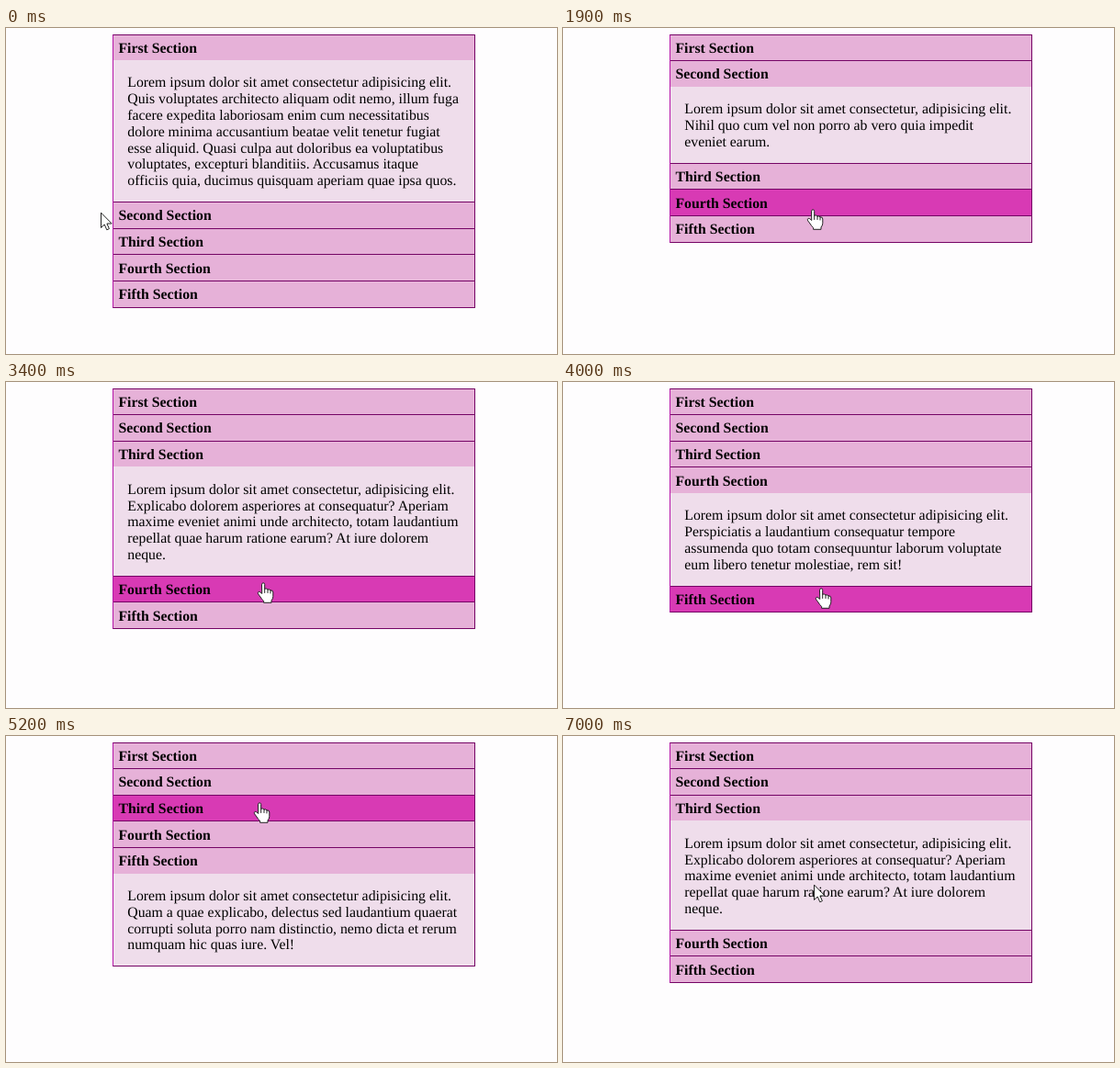
Animation, 600 px wide and 355 px high, one loop 7100 ms. Source, as an HTML page:

```html
<!DOCTYPE html>
<html lang="en">
<head>
<meta charset="utf-8">
<title>Accordion</title>
<style>
  html, body { margin: 0; width: 100%; height: 100%; overflow: hidden; background: #fefdfe; }
  body {
    position: relative;
    font: 15.8px/17.78px "Liberation Serif", "Times New Roman", Times, serif;
    color: #000;
    text-rendering: geometricPrecision;
  }
  #box {
    position: absolute; left: 116px; top: 7px; width: 395px; box-sizing: border-box;
    border: 1px solid #750465; border-left-color: #b515a8;
    background: #efddeb; overflow: hidden;
  }
  .head, .text { position: absolute; left: 0; right: 0; white-space: pre; }
  .head {
    box-sizing: border-box; border-top: 1px solid #750465;
    padding-left: 5.4px; background: #e6b1d8; font-weight: bold;
  }
  .head.hover { background: #d83ab4; }
  .text { padding-left: 15.3px; display: none; }
  .text.open { display: block; }
  #cursor { position: absolute; left: 0; top: 0; overflow: visible; }
  #cursor g { display: none; }
  #cursor .on { display: inline; }
</style>
</head>
<body>
<div id="box"></div>
<svg id="cursor" width="1" height="1" fill="#fff" stroke="#222" stroke-linejoin="round" stroke-linecap="round">
  <g id="arrow"><path d="M.5 .5V16.5L4.2 13L6.8 18.8L9.4 17.6L6.9 12H11.8Z"/></g>
  <g id="hand">
    <path d="M-1.5 2.5Q-1.5 .8 .1 .8Q1.7 .8 1.7 2.5V7.2Q4.4 6.2 5 8.2Q7.4 7 8 9Q10.8 8.4 10.8 11V15.5Q10.8 18 9 20V22.3H.6V20.5Q-1.6 18.5 -3 16L-5.4 12.8Q-6.4 11 -4.8 10.4Q-3.4 10 -1.5 12.2Z"/>
    <path fill="none" d="M1.7 7.2V11.5M5 8.2V11.5M8 9V12"/>
  </g>
  <g id="beam"><path fill="none" d="M-3 -6.5H-1Q0 -6.5 0 -5.5Q0 -6.5 1 -6.5H3M0 -5.5V5.5M-3 6.5H-1Q0 6.5 0 5.5Q0 6.5 1 6.5H3"/></g>
</svg>
<script>
const LOOP = 7100, STEP = 100, SCALE = 0.988;
const TOP = 6.8, BOX_TOP = 8, TITLE_PAD = 5.8;
const HEAD = 29, LINE = 18, PAD = 15;

const sections = [
  ["First", `Lorem ipsum dolor sit amet consectetur adipisicing elit.
Quis voluptates architecto aliquam odit nemo, illum fuga
facere expedita laboriosam enim cum necessitatibus
dolore minima accusantium beatae velit tenetur fugiat
esse aliquid. Quasi culpa aut doloribus ea voluptatibus
voluptates, excepturi blanditiis. Accusamus itaque
officiis quia, ducimus quisquam aperiam quae ipsa quos.`],
  ["Second", `Lorem ipsum dolor sit amet consectetur, adipisicing elit.
Nihil quo cum vel non porro ab vero quia impedit
eveniet earum.`],
  ["Third", `Lorem ipsum dolor sit amet consectetur, adipisicing elit.
Explicabo dolorem asperiores at consequatur? Aperiam
maxime eveniet animi unde architecto, totam laudantium
repellat quae harum ratione earum? At iure dolorem
neque.`],
  ["Fourth", `Lorem ipsum dolor sit amet consectetur adipisicing elit.
Perspiciatis a laudantium consequatur tempore
assumenda quo totam consequuntur laborum voluptate
eum libero tenetur molestiae, rem sit!`],
  ["Fifth", `Lorem ipsum dolor sit amet consectetur adipisicing elit.
Quam a quae explicabo, delectus sed laudantium quaerat
corrupti soluta porro nam distinctio, nemo dicta et rerum
numquam hic quas iure. Vel!`]
];

// [time, section opened]
const clicks = [[-1000, 0], [1800, 1], [2900, 2], [3700, 3], [4400, 4], [5700, 1], [6700, 2]];

// [time, x, y] of the pointer's hot spot
const path = [
  [0, 103, 201], [100, 103, 201], [700, 268, 203], [1300, 272, 197], [2200, 272, 197],
  [2600, 274, 162], [3000, 274, 162], [3500, 281, 224], [4000, 281, 223.5], [4200, 281, 231],
  [4700, 281, 231], [5200, 276, 71.5], [5400, 276, 50], [5800, 276, 50], [6200, 276.5, 112],
  [6500, 273, 162], [LOOP, 273, 162]
];

const box = document.getElementById("box");
const cursor = document.getElementById("cursor");
const shapes = [...cursor.children];

function add(className, text) {
  const el = document.createElement("div");
  el.className = className;
  el.textContent = text;
  return box.appendChild(el);
}

const rows = sections.map(([name, text]) => ({
  head: add("head", name + " Section"),
  body: add("text", text),
  height: text.split("\n").length * LINE + 2 * PAD
}));

const toPx = units => Math.floor(TOP + units * SCALE);

// Lays out the rows and returns the top edge of each, then the bottom edge.
// Edges snap to whole pixels, text keeps its fractional place.
function layout(open) {
  const edges = [];
  let y = 0;
  rows.forEach((row, i) => {
    const top = toPx(y);
    edges.push(top);
    row.head.style.top = top - BOX_TOP + "px";
    row.head.style.paddingTop = TOP + y * SCALE - top + TITLE_PAD + "px";
    y += HEAD;
    row.head.style.height = toPx(y) - top + "px";
    row.body.classList.toggle("open", i === open);
    if (i === open) {
      row.body.style.top = (y + PAD) * SCALE + "px";
      y += row.height;
    }
  });
  edges.push(toPx(y));
  box.style.height = toPx(y) - BOX_TOP + 2 + "px";
  return edges;
}

function pointerAt(t) {
  const i = path.findIndex(p => p[0] > t);
  const [t0, x0, y0] = path[i - 1], [t1, x1, y1] = path[i];
  const u = (t - t0) / (t1 - t0), k = u * u * (3 - 2 * u);
  return [x0 + (x1 - x0) * k, y0 + (y1 - y0) * k];
}

function render(t) {
  const [since, open] = clicks.filter(c => c[0] <= t).pop();
  const edges = layout(open);
  const [x, y] = pointerAt(t);
  const inside = x >= 116 && x < 511 && y >= edges[0] && y < edges[5];
  const over = inside ? edges.findIndex((e, i) => y >= e && y < edges[i + 1]) : -1;
  const onHead = over >= 0 && y < edges[over] + HEAD * SCALE;
  rows.forEach((row, i) => row.head.classList.toggle("hover", onHead && i === over));

  const kind = onHead ? "hand" : inside && t - since > 400 ? "beam" : "arrow";
  shapes.forEach(s => s.classList.toggle("on", s.id === kind));
  cursor.style.transform = `translate(${Math.round(x)}px, ${Math.round(y)}px)`;
}

const start = performance.now();
function tick() {
  const t = (performance.now() - start) % LOOP;
  render(Math.floor(t / STEP) * STEP);
  requestAnimationFrame(tick);
}
tick();
</script>
</body>
</html>
```
